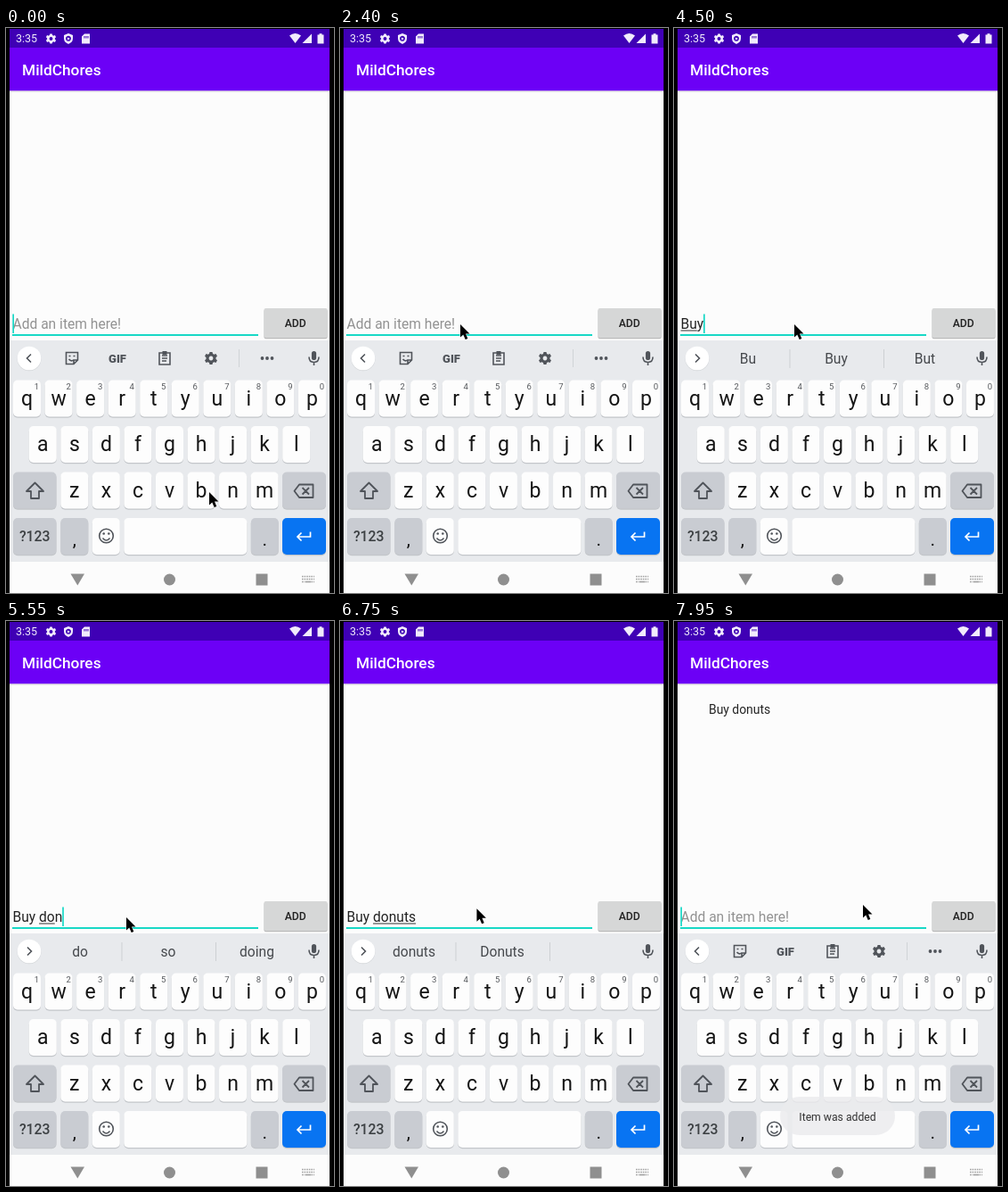
An HTML page that plays this animation: 368x633 px, repeating every 8 s.

```html
<!DOCTYPE html>
<html lang="en">
<head>
<meta charset="utf-8">
<title>Todo list demo</title>
<style>
html, body { margin: 0; width: 100%; height: 100%; overflow: hidden; background: #000; }
svg { display: block; width: 368px; height: 633px; }
text { font-family: Roboto, Arial, sans-serif; white-space: pre; }
.mid { text-anchor: middle; }
.line { fill: none; stroke: #50545a; stroke-width: 1.6; }
</style>
</head>
<body>
<svg id="stage" viewBox="0 0 368 633">
  <defs>
    <path id="gear" fill-rule="evenodd" d="M-1.5-7h3l.5 2 1.5.8 2-.7 1.5 2.6-1.5 1.4v1.8l1.5 1.4-1.5 2.6-2-.7-1.5.8-.5 2h-3l-.5-2-1.5-.8-2 .7-1.5-2.6 1.5-1.4v-1.8l-1.5-1.4 1.5-2.6 2 .7 1.5-.8zM0-2.4a2.4 2.4 0 1 0 .01 0z"/>
  </defs>
  <rect x="4" y="1" width="359" height="632" fill="#fcfcfc"/>
  <rect x="4" y="1" width="359" height="21" fill="#3f00b5"/>
  <rect x="4" y="22" width="359" height="48.5" fill="#6c00f6"/>
  <rect x="4" y="70.5" width="359" height="1" fill="#d8d8d8"/>

  <g fill="#f1ebfc">
    <text x="11" y="16.3" font-size="12.5">3:35</text>
    <use href="#gear" transform="translate(50.5 12) scale(.8)"/>
    <path fill-rule="evenodd" d="M70 6l5 2v3.500q0 4.500-5 6.500-5-2-5-6.500V8zM70 8.700a3 3 0 1 0 .01 0zM69 10.500l3 1.500-3 1.500z"/>
    <path fill-rule="evenodd" d="M88 6.500h6v11h-9v-8zM87.500 9v2.500h1V9zM89.500 9v2.500h1V9zM91.500 9v2.500h1V9z"/>
    <path d="M318 8.500q6.500-5 13 0L324.500 17z"/>
    <path d="M343 6.500v10.500h-10.500z"/>
    <path d="M349.500 7.500h2V6.300h3v1.200h2v10h-7z"/>
  </g>
  <text x="18" y="53" font-size="17.300" font-weight="500" fill="#fff">MildChores</text>

  <text id="item" x="39" y="104.300" font-size="13.900" fill="#242424">Buy donuts</text>
  <rect x="7" y="343" width="276" height="2" fill="#18d8c6"/>
  <text id="input" x="7.500" y="337" font-size="15.600"/>
  <rect id="under" y="338.500" height="1" fill="#333"/>
  <rect id="caret" y="320.500" width="1.700" height="21.500" fill="#18d8c6"/>
  <rect x="289.500" y="315" width="71" height="33.300" rx="2" fill="#bbb"/>
  <rect id="button" x="289.500" y="314" width="71" height="33" rx="2"/>
  <text class="mid" x="324.700" y="335" font-size="12.200" font-weight="500" fill="#222">ADD</text>

  <rect x="4" y="350" width="359" height="248" fill="#e8eaed"/>
  <circle cx="26" cy="370.800" r="13.500" fill="#d4d7da"/>
  <circle cx="26" cy="370" r="13.300" fill="#fff"/>
  <path id="chevron" class="line" d="M2-4.500L-2.500 0 2 4.500"/>
  <g class="line" transform="translate(345.500 370)">
    <rect x="-2.600" y="-8" width="5.200" height="10" rx="2.600" fill="#50545a" stroke="none"/>
    <path d="M-5.500-1.500Q-5.500 4.500 0 4.500T5.500-1.500M0 4.500V8"/>
  </g>
  <g id="tools">
    <g class="line" transform="translate(74 370)">
      <path d="M-6.500-6.500h13V2L2 6.500h-8.500zM6.500 2H2v4.500M-3.500 1Q-1 4 1.500 2"/>
      <path d="M-3.500-2.500h2M1.500-2.500h2"/>
    </g>
    <text class="mid" x="125" y="374.500" font-size="13" font-weight="900" fill="#50545a">GIF</text>
    <g class="line" transform="translate(178 370)">
      <path d="M-6-6H6V7H-6zM-3-3H3M-3 0H3M-3 3H2"/>
      <rect x="-2.500" y="-8" width="5" height="4" fill="#50545a" stroke="none"/>
    </g>
    <use href="#gear" x="230" y="370" fill="#50545a"/>
    <path d="M261.500 360v20" stroke="#d0d3d6"/>
    <g fill="#50545a"><circle cx="287.500" cy="370" r="1.900"/><circle cx="293" cy="370" r="1.900"/><circle cx="298.500" cy="370" r="1.900"/></g>
  </g>
  <g id="words" fill="#46494d" font-size="15.600">
    <path d="M130 360v21M235.500 360v21" stroke="#cdd0d3"/>
    <text class="mid" x="83" y="376"/><text class="mid" x="182" y="376"/><text class="mid" x="281.500" y="376"/>
    <g id="donut" transform="translate(182 370.500)">
      <ellipse cy="1" rx="9" ry="7.300" fill="#d99145"/>
      <ellipse cy="-.7" rx="8.500" ry="6" fill="#8a4a35"/>
      <path d="M-6-2l2-1M-2 3l2 .5M4-4l2 1M5 1l1 1.500M-5 2l1 1M0-5l1 .5" stroke="#f0a3b4" stroke-width="1.200"/>
      <ellipse cy="-1" rx="3" ry="1.800" fill="#eccb9f"/>
    </g>
  </g>

  <g id="keys"></g>
  <g class="line" stroke-linejoin="round">
    <path stroke-width="1.800" d="M32.500 509.500l9.500 9.500h-5v8h-9v-8h-5z"/>
    <path stroke-width="1.800" d="M329 511.500h15.500v14.500H329l-5.500-7.200zM332.500 515l7.500 7.500M340 515l-7.500 7.500"/>
    <circle cx="112.500" cy="569" r="7.800"/>
    <path d="M108.500 571.500q4 5 8 0"/>
  </g>
  <circle cx="109.700" cy="566.500" r="1.300" fill="#50545a"/><circle cx="115.300" cy="566.500" r="1.300" fill="#50545a"/>
  <path d="M341.500 564.500v5.500h-14M331.500 565.500L327 570l4.500 4.500" fill="none" stroke="#fff" stroke-width="1.700"/>

  <g fill="#8f8f8f">
    <path d="M72.500 611.500h15.500l-7.700 13z"/>
    <circle cx="183.500" cy="618" r="6.500"/>
    <rect x="280.500" y="611.500" width="13" height="13"/>
    <path d="M332 614.500h14M332 617.500h14M332 620.500h3.500M342.500 620.500h3.500" stroke="#a0a0a0" stroke-width="1.600" stroke-dasharray="1.600 1"/>
    <path d="M336 620.500h6" stroke="#a0a0a0" stroke-width="1.600"/>
  </g>

  <g id="toast">
    <rect x="119" y="533" width="129" height="43" rx="21.500" fill="#ececee" opacity=".8"/>
    <text class="mid" x="183.500" y="559.500" font-size="12.200" fill="#333">Item was added</text>
  </g>
  <path id="pointer" d="M0 0V14.500L3.300 11.500 5.700 17 8.300 15.900 6 10.500H10.500Z" fill="#000" stroke="#fff" stroke-width="1" paint-order="stroke"/>
</svg>
<script>
const $ = id => document.getElementById(id);
const show = (el, on) => el.style.display = on ? '' : 'none';

// Keyboard
let keys = '';
function key(x, y, w, label = '', fill = '#fdfdfd', size = 23, dy = 28) {
  keys += `<rect x="${x}" y="${y + 1.2}" width="${w}" height="41" rx="5" fill="#c3c6ca"/>
    <rect x="${x}" y="${y}" width="${w}" height="41" rx="5" fill="${fill}"/>
    <text class="mid" x="${x + w / 2}" y="${y + dy}" font-size="${size}" fill="#151515">${label}</text>`;
}
const grey = '#c9ccd2', pitch = 35.55;
[['qwertyuiop', 8, 394.5], ['asdfghjkl', 25.8, 446], ['zxcvbnm', 61.3, 497.5]].forEach(([row, x, y], r) =>
  [...row].forEach((ch, i) => {
    key(x + i * pitch, y, 31, ch);
    if (!r) keys += `<text class="mid" x="${x + i * pitch + 26.5}" y="405" font-size="9.5" fill="#55585c">${(i + 1) % 10}</text>`;
  }));
key(8, 497.5, 48.5, '', grey);
key(310, 497.5, 49, '', grey);
key(8, 549, 48.5, '<tspan font-weight="500" fill="#3c4043">?123</tspan>', grey, 15.8, 26);
key(61.3, 549, 31, ',', grey, 21, 31);
key(96.8, 549, 31);
key(132.3, 549, 138);
key(274.8, 549, 31, '.', grey, 21, 31);
key(310, 549, 49, '', '#0874f2');
$('keys').innerHTML = keys;

// [start, typed text, underline from, underline to, suggestions]
const typing = [
  [0, '', 0, 0],
  [3900, 'B', 0, 0],
  [4200, 'B', 0, 1, 'B,But,By'],
  [4350, 'Bu', 0, 1, 'B,But,By'],
  [4500, 'Buy', 0, 2, 'Bu,Buy,But'],
  [4800, 'Buy', 0, 3, 'Buy,But,Buying'],
  [4950, 'Buy ', 0, 3, 'Buy,But,Buying'],
  [5250, 'Buy d', 4, 4, 'the,a,it'],
  [5550, 'Buy don', 4, 6, 'do,so,doing'],
  [5700, 'Buy donu', 4, 7, "don,don't,done"],
  [5850, 'Buy donut', 4, 8, 'donu,donut,donuts'],
  [6150, 'Buy donuts', 4, 9, 'donut,*,Donuts'],
  [6300, 'Buy donuts', 4, 10, 'donuts,Donuts,'],
  [7800, '', 0, 0]
];
const caretOff = [[150, 600], [1200, 1650], [2100, 2700], [3150, 3600], [6750, 7200]];
// [start, end, from x, from y, to x, to y, upward arc]
const moves = [
  [0, 150, 228, 520, 223, 520, 0],
  [1800, 2400, 223, 520, 135, 332, 0],
  [6600, 7350, 135, 332, 312, 323, 15],
  [7650, 7950, 312, 323, 212, 318, 0]
];
const input = $('input'), words = [...$('words').querySelectorAll('text')];
const widthOf = n => n ? input.getSubStringLength(0, n) : 0;

function draw(t) {
  const [, text, from, to, list] = typing.findLast(s => s[0] <= t);
  input.textContent = text || 'Add an item here!';
  input.setAttribute('fill', text ? '#222' : '#929292');
  const start = widthOf(from);
  $('under').setAttribute('x', 7.5 + start);
  $('under').setAttribute('width', widthOf(to) - start);
  $('caret').setAttribute('x', 7.3 + widthOf(text.length));
  show($('caret'), !caretOff.some(([a, b]) => t >= a && t < b));

  show($('tools'), !list);
  show($('words'), list);
  const picks = (list || ',,').split(',');
  words.forEach((w, i) => w.textContent = picks[i] === '*' ? '' : picks[i]);
  show($('donut'), picks[1] === '*');
  $('chevron').setAttribute('transform', `translate(26 370) scale(${list ? -1 : 1} 1)`);

  $('button').setAttribute('fill', t >= 7650 && t < 7800 ? '#c4c5c5' : '#d6d7d7');
  show($('item'), t >= 7800);
  show($('toast'), t >= 7950);

  const [a, b, x0, y0, x1, y1, arc] = moves.findLast(m => m[0] <= t);
  const p = Math.min(1, (t - a) / (b - a)), e = p * p * (3 - 2 * p);
  const x = x0 + (x1 - x0) * e, y = y0 + (y1 - y0) * e - arc * Math.sin(Math.PI * p);
  $('pointer').setAttribute('transform', `translate(${x} ${y})`);
}

const origin = performance.now();
let last = -1;
function tick() {
  const t = Math.floor((performance.now() - origin) % 8000 / 150) * 150;
  if (t !== last) draw(last = t);
  requestAnimationFrame(tick);
}
tick();
</script>
</body>
</html>
```
